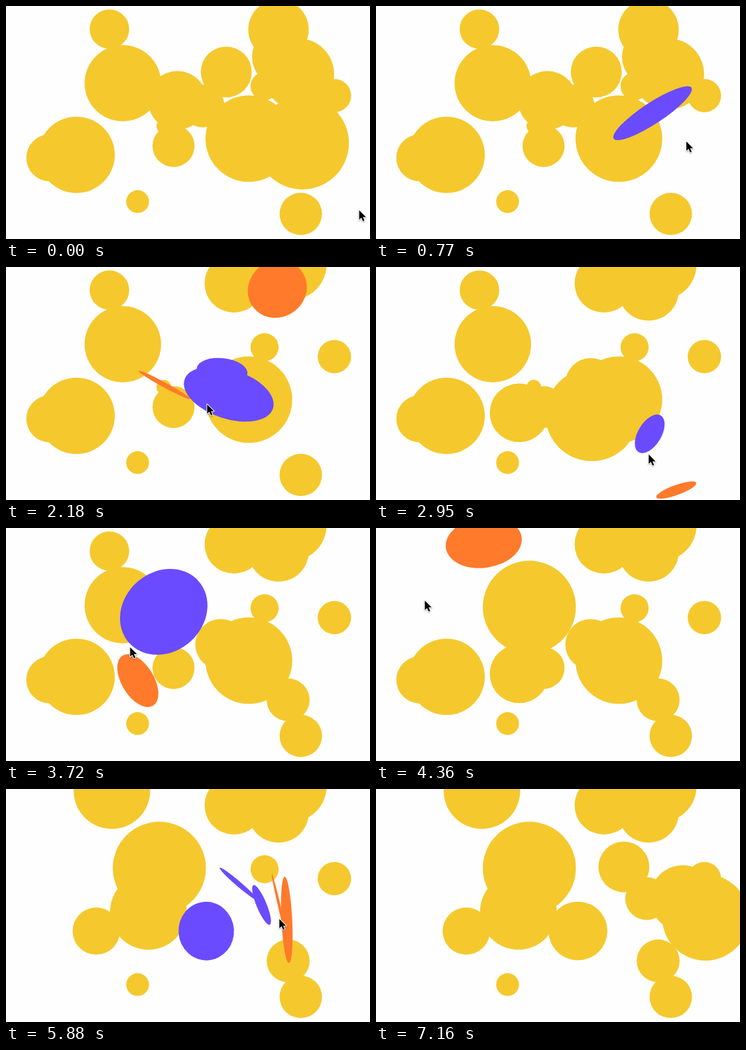
An HTML page with a canvas for the animation above (7.55 s loop, 549x353 px).

```html
<!DOCTYPE html>
<html lang="en">
<head>
<meta charset="utf-8">
<title>Flipping discs</title>
<style>
  html, body { margin: 0; width: 100%; height: 100%; overflow: hidden; background: #fefefe; }
  canvas { display: block; width: 549px; height: 353px; }
</style>
</head>
<body>
<canvas id="stage" width="549" height="353"></canvas>
<script>
const ctx = document.getElementById('stage').getContext('2d');
const W = 549, H = 353, LOOP = 7550, STEP = 1000 / 17, FLIP = 870;
const YELLOW = '#f5c82d', ORANGE = '#ff7a2b', PURPLE = '#6a4bff';
const rad = deg => deg * Math.PI / 180;

// A move starts at a time and tips the disc over its rim along a heading in degrees.
// With a limit it only tips that far and falls back.
const move = color => (start, heading, { dur = FLIP, limit = 0 } = {}) =>
  ({ color, start, heading: rad(heading), dur, limit });
const orange = move(ORANGE), purple = move(PURPLE);
const disc = (x, y, r, ...moves) => ({ x, y, r, moves });

const discs = [
  disc(238, 182, 11),
  disc(198.5, 296.3, 17.2),
  disc(390, 121.5, 21.2),
  disc(495.3, 135.8, 25.2),
  disc(156, 35, 29.8, purple(3950, -94)),
  disc(252.7, 212.2, 31.7, purple(5260, 0)),
  disc(444.6, 315, 32, orange(2720, 70, { limit: 105 })),
  disc(370, 227, 32.4, purple(2480, 31)),
  disc(297, 151.5, 32.4, purple(1750, 37.4), purple(5508, -22.4)),
  disc(66.3, 230, 35.7, orange(4852, -11.9)),
  disc(332.2, 100, 38.4, purple(1727, 96.2), purple(5541, -49.4)),
  disc(411, 35.7, 45.6, orange(1418, -127, { limit: 55 })),
  disc(441, 103, 53.8, orange(1106, -96)),
  disc(415.3, 77, 44.3, orange(1217, -143.8)),
  disc(176.2, 117, 57.7, orange(3850, -98.2)),
  disc(366.3, 201, 65.4, orange(5593, -2.8)),
  disc(365.5, 188, 50, orange(5574, -13)),
  disc(106.3, 225.5, 57.8, orange(5007, -20.2)),
  disc(258.5, 143, 44.4,
    orange(1878, 118.6), orange(3390, 149, { limit: 62 }), purple(5215, -3.8)),
  disc(447, 207.7, 70.2,
    purple(375, -123.4, { dur: 1270 }), purple(1719, 108.3), purple(3107, -132.2))
];

// Pointer key points: time, x, y
const path = [
  [0, 533, 310], [770, 468, 205], [1361, 444.5, 80], [1680, 388, 32],
  [2184, 303.5, 209], [2720, 428, 278], [3120, 372, 274], [3713, 186.5, 180],
  [3960, 166, 80], [4600, 25, 150], [4900, 30, 236], [5184, 109.5, 232],
  [5884, 411.5, 197], [6500, 552, 176]
];

function slope(i, k) {
  const a = path[Math.max(i - 1, 0)], b = path[Math.min(i + 1, path.length - 1)];
  return (b[k] - a[k]) / (b[0] - a[0]);
}

// Smooth curve through the key points
function pointerAt(t) {
  const i = path.findIndex(p => p[0] > t) - 1;
  if (i < 0) return null;
  const a = path[i], b = path[i + 1], d = b[0] - a[0], u = (t - a[0]) / d;
  const u2 = u * u, u3 = u2 * u;
  return [1, 2].map(k => a[k] + (b[k] - a[k]) * (3 * u2 - 2 * u3)
    + d * (slope(i, k) * (u3 - 2 * u2 + u) + slope(i + 1, k) * (u3 - u2)));
}

function poseAt({ x, y, r, moves }, t) {
  for (const { color, start, heading, dur, limit } of moves) {
    const p = (t - start) / dur;
    if (p < 0) break;
    const moving = p < 1;
    if (!moving && limit) continue;
    const tilt = !moving ? 180
      : limit ? limit * Math.sin(Math.PI * p)
      : 180 * (1 - (1 - p) ** 1.5);
    const c = Math.cos(rad(tilt));
    x += r * (1 - c) * Math.cos(heading);
    y += r * (1 - c) * Math.sin(heading);
    if (moving) return { x, y, r, color, moving, heading, squash: Math.max(r * Math.abs(c), 0.6) };
  }
  return { x, y, r, color: YELLOW, moving: false, heading: 0, squash: r };
}

function drawDisc({ x, y, r, squash, heading, color }) {
  ctx.fillStyle = color;
  ctx.beginPath();
  ctx.ellipse(x, y, squash, r, heading, 0, Math.PI * 2);
  ctx.fill();
}

const arrow = new Path2D('M0 0V14.2L3.3 11.2L5.7 16.6L8 15.6L5.7 10.3H10.2Z');

function drawPointer(x, y) {
  ctx.save();
  ctx.translate(x, y);
  ctx.lineJoin = 'round';
  ctx.lineWidth = 2;
  ctx.strokeStyle = '#fff';
  ctx.shadowColor = 'rgba(0,0,0,.35)';
  ctx.shadowBlur = 2;
  ctx.shadowOffsetY = 1;
  ctx.stroke(arrow);
  ctx.shadowColor = 'transparent';
  ctx.fillStyle = '#000';
  ctx.fill(arrow);
  ctx.restore();
}

function draw(ms) {
  // hold each picture for one step, with a little slack at the boundary
  const t = Math.floor((ms % LOOP) / STEP + 0.1) * STEP + 4;
  ctx.fillStyle = '#fefefe';
  ctx.fillRect(0, 0, W, H);
  const poses = discs.map(d => poseAt(d, t));
  poses.filter(p => !p.moving).forEach(drawDisc);
  poses.filter(p => p.moving).forEach(drawDisc);
  const tip = pointerAt(t);
  if (tip) drawPointer(...tip);
}

const began = performance.now();
function tick() {
  draw(performance.now() - began);
  requestAnimationFrame(tick);
}
tick();
</script>
</body>
</html>
```
